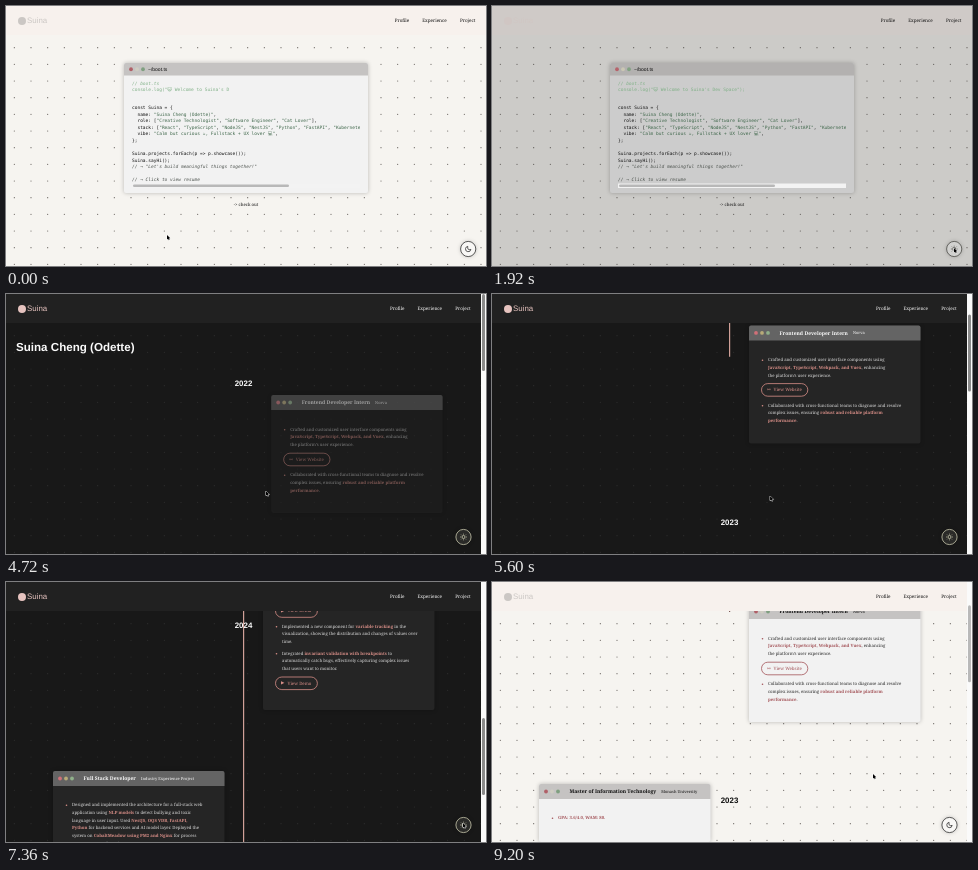
Recreate the animation shown at these times as an HTML page with a canvas. Size 480 by 260 pixels, loop 9280 ms.

```html
<!DOCTYPE html>
<html lang="en">
<meta charset="utf-8">
<title>Portfolio</title>
<style>
  html, body { margin: 0; width: 100%; height: 100%; overflow: hidden; }
  canvas { display: block; }
</style>
<canvas width="480" height="260"></canvas>
<script>
const ctx = document.querySelector('canvas').getContext('2d');
const LOOP = 9280, STEP = 80, PAGE_SWAP = 4320, TILE = 50 / 3;
const SERIF = '"Noto Serif", serif', SANS = '"Liberation Sans", sans-serif';
const MONO = '"DejaVu Sans Mono", "DejaVu Sans", monospace';

// [light, dark]
const palette = {
  page: ['#f6f4f0', '#181818'], nav: ['#f7f1ed', '#212121'], dot: ['#68635f', '#2f2f2f'],
  card: ['#f2f2f2', '#252525'], bar: ['#c5c3c2', '#646464'], ink: ['#101010', '#fafafa'],
  body: ['#2c2c2c', '#dcdcdc'], accent: ['#a4555a', '#d98f88'], line: ['#7d5b58', '#d0a098'],
  logo: ['#cbc7c4', '#e6c3bf'], string: ['#3c6548', '#9dbf9f'], comment: ['#7fb086', '#7fb086'],
  note: ['#4a504b', '#a0a0a0'], red: ['#b06068', '#d07078'], mid: ['#cfcdc2', '#b8ab78'],
  green: ['#7f9f80', '#8fb08a'], button: ['#f8f7f5', '#2a2a28'], edge: ['#333333', '#c9c8ae'],
  thumb: ['#b9b9b9', '#8a8a8a']
};
// Text colours flip at once, surfaces fade
const flipping = ['ink', 'body', 'string', 'note'];
let colour = {};

const clamp = v => Math.min(1, Math.max(0, v));
const ramp = (t, from, to) => clamp((t - from) / (to - from));
const easeOut = v => 1 - (1 - v) ** 2;

function mix([a, b], p) {
  const part = (hex, i) => parseInt(hex.slice(i, i + 2), 16);
  return `rgb(${[1, 3, 5].map(i => Math.round(part(a, i) + (part(b, i) - part(a, i)) * p))})`;
}

// keys: [time, value, value...], linear between them
function track(keys, t) {
  const i = keys.findIndex(k => k[0] > t);
  if (i === 0) return keys[0].slice(1);
  if (i < 0) return keys[keys.length - 1].slice(1);
  const [a, b] = [keys[i - 1], keys[i]], k = ramp(t, a[0], b[0]);
  return a.slice(1).map((v, j) => v + (b[j + 1] - v) * k);
}

const cursorKeys = [[240, 161, 229], [1000, 330, 236], [1760, 462, 242], [2240, 462, 242],
  [3000, 350, 218], [3840, 254, 198], [4720, 260, 197], [5520, 262, 198], [6240, 407, 234],
  [6500, 407, 234], [7360, 457, 241], [8160, 457, 241], [8480, 381, 192]];
const scrollKeys = [[5440, 0], [6240, 348], [6960, 460], [8320, 460], [8400, 452], [8480, 437], [9200, 79]];
const lineKeys = [[5520, 98], [6240, 407], [6880, 760], [8480, 760], [9200, 109]];

function text(str, x, y, size, fill, font = SERIF, style = '', align = 'left') {
  ctx.font = `${style} ${size}px ${font}`;
  ctx.fillStyle = fill;
  ctx.textAlign = align;
  ctx.fillText(str, x, y);
  return ctx.measureText(str).width;
}

function rich(str, x, y) {
  str.split('*').forEach((part, i) => {
    x += i % 2 ? text(part, x, y, 4.3, colour.accent, SERIF, 'bold')
               : text(part, x, y, 4.3, colour.body);
  });
}

function circle(x, y, r, fill) {
  ctx.beginPath();
  ctx.arc(x, y, r, 0, 7);
  ctx.fillStyle = fill;
  ctx.fill();
}

function box(x, y, w, h, r, fill) {
  ctx.beginPath();
  ctx.roundRect(x, y, w, h, r);
  ctx.fillStyle = fill;
  ctx.fill();
}

function withShadow(paint) {
  ctx.save();
  ctx.shadowColor = 'rgba(0,0,0,.25)';
  ctx.shadowBlur = 4;
  paint();
  ctx.restore();
}

function windowFrame(x, y, w, h, barHeight) {
  withShadow(() => box(x, y, w, h, 2, colour.card));
  box(x, y, w, barHeight, [2, 2, 0, 0], colour.bar);
  ['red', 'mid', 'green'].forEach((c, i) => circle(x + 7 + i * 6, y + barHeight / 2, 1.9, colour[c]));
}

const code = [
  [102, 'const Suina = {'],
  [108.5, '  name: "Suina Cheng (Odette)",'],
  [115, '  role: ["Creative Technologist", "Software Engineer", "Cat Lover"],'],
  [121.5, '  stack: ["React", "TypeScript", "NodeJS", "NestJS", "Python", "FastAPI", "Kubernetes"],'],
  [128, '  vibe: "Calm but curious ☕, Fullstack + UX lover 💻",'],
  [134.5, '};'],
  [148, 'Suina.projects.forEach(p => p.showcase());'],
  [154.5, 'Suina.sayHi();']
];
const greeting = [...'console.log("😺 Welcome to Suina\'s Dev Space");'];

function home(t) {
  windowFrame(118, 57, 244, 130, 12.5);
  text('~/boot.ts', 142, 63.3, 5, colour.ink, SANS);
  ctx.save();
  ctx.beginPath();
  ctx.rect(125, 70, 229, 117);
  ctx.clip();
  const mono = (str, x, y, fill, style) => text(str, x, y, 4.53, fill, MONO, style);
  mono('// boot.ts', 126, 77.5, colour.comment, 'italic');
  mono(greeting.slice(0, 35 + Math.max(0, (t - 240) / STEP)).join(''), 126, 84, colour.comment);
  for (const [y, str] of code) {
    let x = 126;
    str.split(/("[^"]*")/).forEach((part, i) => x += mono(part, x, y, i % 2 ? colour.string : colour.ink));
  }
  mono('// → "Let\'s build meaningful things together!"', 126, 161, colour.note, 'italic');
  mono('// → Click to view resume', 126, 174, colour.note, 'italic');
  box(126, 177.5, 228, 4.5, 0, '#f3f3f3');
  box(127, 178.5, 156, 2.5, 1.2, '#b8b8b8');
  ctx.restore();
  text('-> check out', 240, 199, 4.3, colour.ink, SERIF, '', 'center');
}

// items: [y, text lines] or [y, button label]; y is relative to the card top
const cards = [
  { x: 257, y: 101, h: 118, shown: 4600, title: 'Frontend Developer Intern', sub: 'Norva', items: [
    [34.5, ['Crafted and customized user interface components using',
      '*JavaScript, TypeScript, Webpack, and Vuex*, enhancing', 'the platform’s user experience.']],
    [64.5, '⚯ View Website'],
    [80, ['Collaborated with cross-functional teams to diagnose and resolve',
      'complex issues, ensuring *robust and reliable platform*', '*performance*.']]] },
  { x: 47, y: 281, h: 58, shown: 5660, title: 'Master of Information Technology', sub: 'Monash University', items: [
    [34, ['*GPA: 3.6/4.0, WAM: 80.*']]] },
  { x: 257, y: 406, h: 182, shown: 5960, title: 'Summer Reseach Intern', sub: 'Plotted Walk', items: [
    [34, ['Improved an open-source platform for *visualizing algorithms*',
      'using*TypeScript, React and Bun*, enhancing users’ ability to', 'debug and explore their algorithms.']],
    [61, ['Designed new features for *exploring search traces*, helping',
      'users understand specific sequences of decisions.']],
    [83, '▶ View Demo'],
    [98.5, ['Implemented a new component for *variable tracking* in the',
      'visualization, showing the distribution and changes of values over', 'time.']],
    [125.5, ['Integrated *invariant validation with breakpoints* to',
      'automatically catch bugs, effectively capturing complex issues', 'that users want to monitor.']],
    [155.3, '▶ View Demo']] },
  { x: 47, y: 649, h: 130, shown: 6500, title: 'Full Stack Developer', sub: 'Industry Experience Project', items: [
    [34, ['Designed and implemented the architecture for a full-stack web',
      'application using *NLP models* to detect bullying and toxic',
      'language in user input. Used *NestJS, OQS VDB, FastAPI,*',
      '*Python* for backend services and AI model layer. Deployed the',
      'system on *CobaltMeadow using PM2 and Nginx* for process', 'management and routing.']]] }
];

function pill(label, x, y) {
  const [icon, ...words] = label.split(' ');
  const name = words.join(' ');
  ctx.font = `4.4px ${SERIF}`;
  ctx.beginPath();
  ctx.roundRect(x, y - 6.3, ctx.measureText(name).width + 18, 12.6, 6.3);
  ctx.strokeStyle = colour.accent;
  ctx.lineWidth = 0.8;
  ctx.stroke();
  text(icon, x + 5.5, y, 4.4, colour.accent, '"DejaVu Sans", sans-serif');
  text(name, x + 12, y, 4.4, colour.accent);
}

function drawCard(card, t) {
  const k = easeOut(ramp(t, card.shown, card.shown + 400));
  const x = card.x + (1 - k) * (card.x > 200 ? TILE : -TILE);
  ctx.save();
  ctx.globalAlpha = k;
  windowFrame(x, card.y, 171.5, card.h, 15);
  const width = text(card.title, x + 30.5, card.y + 7.7, 5, colour.ink, SERIF, 'bold');
  text(card.sub, x + 35.5 + width, card.y + 7.7, 4, colour.ink);
  for (const [dy, item] of card.items) {
    const y = card.y + dy;
    if (typeof item === 'string') { pill(item, x + 12.5, y); continue; }
    circle(x + 13.5, y + 0.3, 0.8, colour.accent);
    item.forEach((str, i) => rich(str, x + 19, y + i * 7.75));
  }
  ctx.restore();
}

function experience(t, scroll) {
  ctx.save();
  ctx.translate(0, -scroll);
  text('Suina Cheng (Odette)', 10, 54, 11.6, colour.ink, SANS, 'bold');
  const end = track(lineKeys, t)[0];
  if (end > 98) box(237, 98, 1.2, end - 98, 0, colour.line);
  [[2022, 89.7], [2023, 298], [2024, 503.5]].forEach(([year, y]) =>
    text(year, 237.5, y, 7.9, colour.ink, SANS, 'bold', 'center'));
  cards.forEach(card => drawCard(card, t));
  ctx.restore();
  box(475, 0, 5, 260, 0, '#fafafa');
  box(476, scroll / 3.38, 3, 77, 1.5, colour.thumb);
}

function toggle(x, y, dark) {
  withShadow(() => circle(x, y, 7.6, colour.button));
  ctx.strokeStyle = colour.edge;
  ctx.lineWidth = 0.8;
  ctx.stroke();
  ctx.beginPath();
  if (dark) {
    ctx.arc(x, y, 1.5, 0, 7);
    for (let a = 0; a < 8; a++) {
      const c = Math.cos(a * Math.PI / 4), s = Math.sin(a * Math.PI / 4);
      ctx.moveTo(x + c * 2.4, y + s * 2.4);
      ctx.lineTo(x + c * 3.3, y + s * 3.3);
    }
  } else {
    ctx.arc(x, y, 2.7, 0.15, 4.55);
    ctx.quadraticCurveTo(x - 1.2, y + 1.6, x + 2.7, y + 0.4);
  }
  ctx.stroke();
}

function pointer(x, y) {
  ctx.save();
  ctx.translate(x, y);
  ctx.beginPath();
  [[0, 0], [0, 4.6], [1.1, 3.7], [1.8, 5.2], [2.6, 4.8], [1.9, 3.4], [3.3, 3.3]].forEach(p => ctx.lineTo(...p));
  ctx.closePath();
  ctx.strokeStyle = '#fff';
  ctx.lineWidth = 0.9;
  ctx.stroke();
  ctx.fillStyle = '#000';
  ctx.fill();
  ctx.restore();
}

function draw(now) {
  const t = Math.floor(now % LOOP / STEP) * STEP;
  const night = ramp(t, 1860, 2180) - ramp(t, 7780, 8180);
  const onHome = t < PAGE_SWAP, shift = onHome ? 0 : 4.7;
  for (const name in palette)
    colour[name] = mix(palette[name], flipping.includes(name) ? Math.round(night) : night);
  ctx.textBaseline = 'middle';
  ctx.textRendering = 'geometricPrecision';

  box(0, 0, 480, 260, 0, colour.page);
  for (let x = TILE / 2; x < 480; x += TILE)
    for (let y = TILE / 2; y < 260; y += TILE) circle(x, y, 0.6, colour.dot);

  if (onHome) home(t); else experience(t, track(scrollKeys, t)[0]);

  box(0, 0, onHome ? 480 : 475, 29, 0, colour.nav);
  circle(16, 15, 4, colour.logo);
  text('Suina', 21, 15.3, 7.9, colour.logo, SANS);
  [['Profile', 388.7], ['Experience', 416.2], ['Project', 454]].forEach(([label, x]) =>
    text(label, x - shift, 14.2, 4.6, colour.ink, SERIF, '500'));
  toggle(462.2 - shift, 243, t >= 1860 && t < 7800);
  pointer(...track(cursorKeys, t));
}

requestAnimationFrame(function frame() {
  draw(performance.now());
  requestAnimationFrame(frame);
});
</script>
</html>
```
